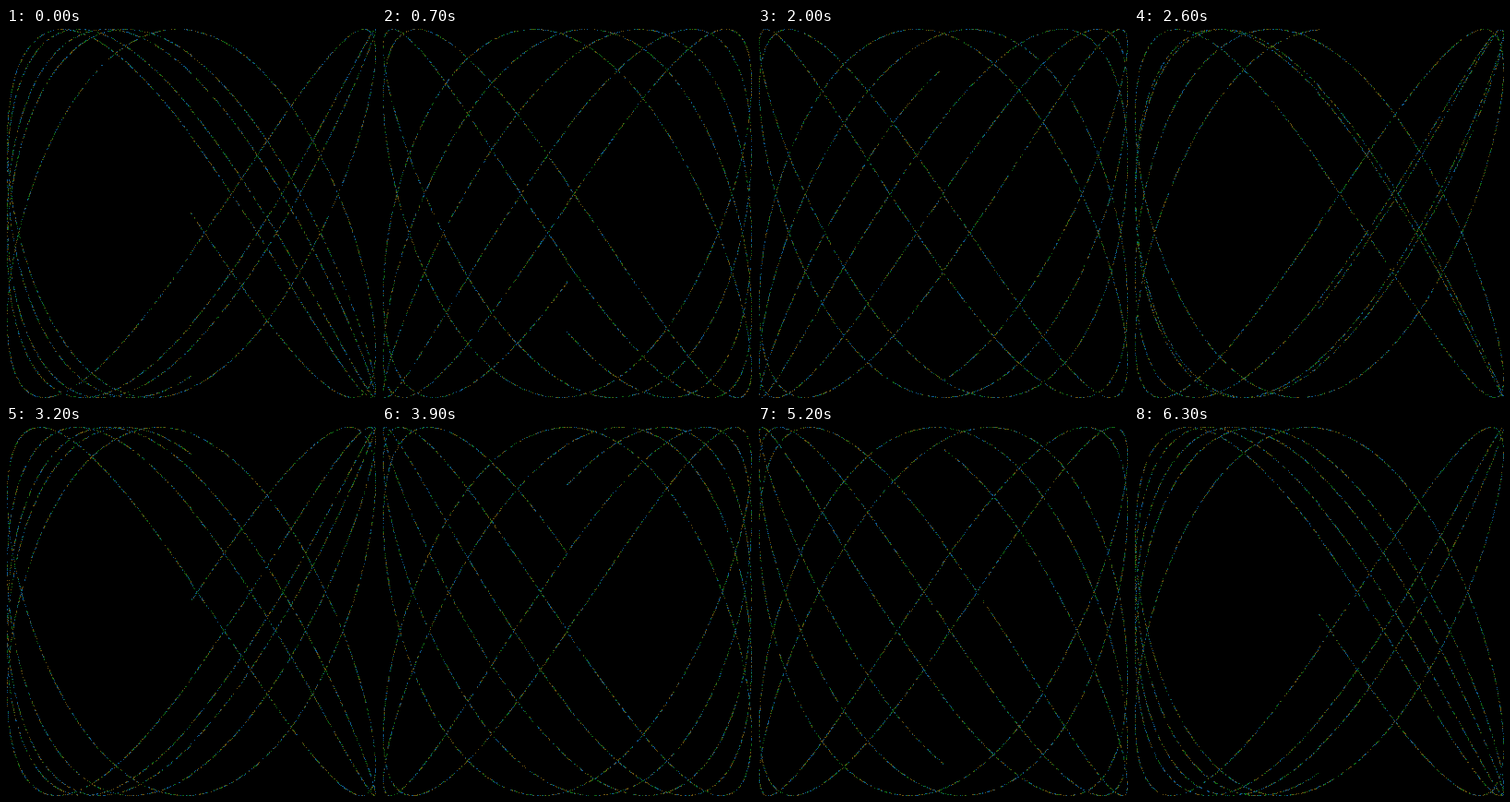
These frames come from a looping animation (401 by 401 pixels, 6400 ms). An HTML page with a canvas:

```html
<!DOCTYPE html>
<html lang="en">
<head>
<meta charset="utf-8">
<title>Lissajous</title>
<style>
  html, body { margin: 0; width: 100%; height: 100%; overflow: hidden; background: #000; }
  canvas { display: block; width: 401px; height: 401px; }
</style>
</head>
<body>
<canvas id="stage" width="401" height="401"></canvas>
<script>
const RADIUS = 200;
const SIDE = 2 * RADIUS + 1;
const STEPS = 64;
const STEP_MS = 100;
const PHASE_STEP = 0.1;
const CYCLES = 5;
const RESOLUTION = 0.001;
const FREQUENCY = 1.46564;
const BLACK_SHARE = 0.5;

const pack = (r, g, b) => (255 << 24 | b << 16 | g << 8 | r) >>> 0;
const BLACK = pack(0, 0, 0);
const INKS = [pack(14, 104, 20), pack(14, 90, 145), pack(108, 84, 16)];

const ctx = document.getElementById('stage').getContext('2d');
const image = ctx.createImageData(SIDE, SIDE);
const pixels = new Uint32Array(image.data.buffer);

function randomSource(seed) {
  return () => {
    seed = (seed + 0x6D2B79F5) | 0;
    let n = Math.imul(seed ^ (seed >>> 15), seed | 1);
    n ^= n + Math.imul(n ^ (n >>> 7), n | 61);
    return ((n ^ (n >>> 14)) >>> 0) / 4294967296;
  };
}

const toPixel = v => RADIUS + Math.trunc(v * RADIUS + 0.5);

function pickColour(random) {
  if (random() < BLACK_SHARE) return BLACK;
  return INKS[Math.floor(random() * INKS.length)];
}

function draw(step) {
  const random = randomSource(step * 7919 + 1);
  const phase = step * PHASE_STEP;
  pixels.fill(BLACK);
  // Each sample takes a random colour; later samples overwrite earlier ones.
  for (let t = 0; t < CYCLES * 2 * Math.PI; t += RESOLUTION) {
    const x = toPixel(Math.sin(t));
    const y = toPixel(Math.sin(t * FREQUENCY + phase));
    pixels[y * SIDE + x] = pickColour(random);
  }
  ctx.putImageData(image, 0, 0);
}

const start = performance.now();
let shown = 0;
draw(0);

function tick() {
  const step = Math.floor((performance.now() - start) / STEP_MS) % STEPS;
  if (step !== shown) {
    shown = step;
    draw(step);
  }
  requestAnimationFrame(tick);
}
requestAnimationFrame(tick);
</script>
</body>
</html>
```
